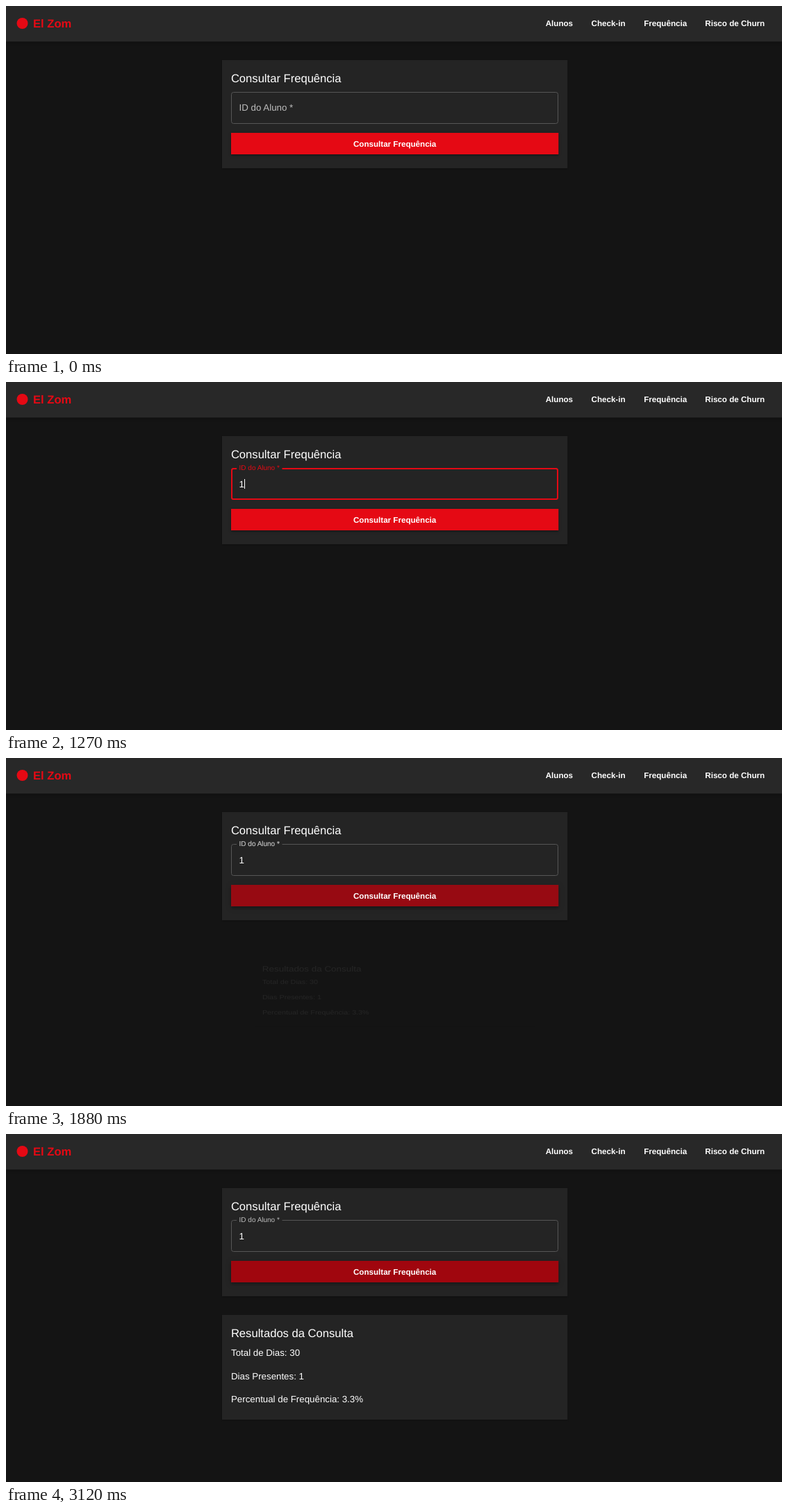
These frames come from a looping animation (1117 by 502 pixels, 4090 ms). An HTML page:

```html
<!DOCTYPE html>
<html lang="pt-BR">
<head>
<meta charset="utf-8">
<title>Consultar Frequência</title>
<style>
  html, body { margin: 0; width: 100%; height: 100%; overflow: hidden; background: #141414; }
  svg { display: block; width: 1117px; height: 502px; }
  text { font-family: "Liberation Sans", Arial, sans-serif; font-size: 13.3px; fill: #fff; text-rendering: geometricPrecision; }
  .title { font-size: 16.6px; }
  .strong { font-size: 11.62px; font-weight: 700; }
  .brand { font-size: 16.6px; font-weight: 700; fill: #e50914; }
  .mark { fill: #e50914; }
  .bar { fill: #282828; filter: drop-shadow(0 2px 2px rgb(0 0 0 / .2)); }
  .card { fill: #242424; filter: drop-shadow(0 1px 1px rgb(0 0 0 / .2)); }

  /* Each delay is a moment on the shared timeline; the script seeks them all. */
  .outline { fill: none; stroke: #565656; animation: whiten 90ms 900ms paused; }
  .focus { fill: none; stroke: #e50914; stroke-width: 2; }
  .focus, .caret { opacity: 0; }
  .focus { animation: show 600ms 990ms paused; }
  .caret { fill: #fff; animation: show 600ms 990ms paused, advance 1ms 1260ms forwards paused; }
  .value { opacity: 0; animation: show 1ms 1260ms forwards paused; }
  .notch {
    fill: #242424; transform: scaleX(0); transform-origin: 332px 124px;
    animation: open 100ms 1040ms cubic-bezier(0, 0, .2, 1) forwards paused;
  }
  .label {
    fill: #bdbdbd; transform: translate(335.6px, 151px);
    animation: shrink 200ms 990ms cubic-bezier(0, 0, .2, 1) forwards paused,
               redden 600ms 990ms paused, thicken 1520ms 1600ms paused;
  }
  .button {
    fill: #e50914;
    filter: drop-shadow(0 2px 1px rgb(0 0 0 / .25)) drop-shadow(0 1px 2px rgb(0 0 0 / .12));
    animation: brush 280ms 830ms paused, darken 250ms 1270ms cubic-bezier(.4, 0, .2, 1) forwards paused,
               press 490ms 1600ms paused;
  }
  .results {
    transform-origin: 559.5px 336.5px;
    animation: grow 560ms 1740ms cubic-bezier(.4, 0, .2, 1) both paused,
               fade 840ms 1750ms cubic-bezier(.4, 0, .2, 1) both paused;
  }

  @keyframes whiten { from, to { stroke: #fff; } }
  @keyframes show { from, to { opacity: 1; } }
  @keyframes advance { from, to { transform: translateX(7px); } }
  @keyframes open { to { transform: none; } }
  @keyframes shrink { to { transform: translate(335.6px, 127px) scale(.75); } }
  @keyframes redden { from, to { fill: #e50914; } }
  @keyframes thicken { from, to { stroke: #bdbdbd; stroke-width: .3px; } }
  @keyframes brush { 36% { fill: #de0913; } }
  @keyframes darken {
    to {
      fill: #a0060e;
      filter: drop-shadow(0 3px 2px rgb(0 0 0 / .25)) drop-shadow(0 1px 4px rgb(0 0 0 / .12));
    }
  }
  @keyframes press { 57% { fill: #970a12; } }
  @keyframes grow { from { transform: scale(.75, .5625); } to { transform: none; } }
  @keyframes fade { from { opacity: 0; } to { opacity: 1; } }
</style>
</head>
<body>
<svg viewBox="0 0 1117 502">
  <rect class="bar" width="1117" height="51.3"/>
  <circle class="mark" cx="23.5" cy="25" r="8"/>
  <text class="brand" x="39" y="31">El Zom</text>
  <g>
    <text class="strong" x="776.7" y="29">Alunos</text>
    <text class="strong" x="842.5" y="29">Check-in</text>
    <text class="strong" x="918.2" y="29">Frequência</text>
    <text class="strong" x="1006.3" y="29">Risco de Churn</text>
  </g>

  <rect class="card" x="311" y="78" width="497.3" height="156"/>
  <text class="title" x="323.9" y="110">Consultar Frequência</text>
  <rect class="outline" x="324.5" y="124.5" width="470" height="45" rx="3"/>
  <rect class="focus" x="325" y="125" width="469" height="44" rx="2.5"/>
  <rect class="notch" x="332" y="123" width="65.5" height="3.2"/>
  <text class="label">ID do Aluno *</text>
  <text class="value" x="335.6" y="152">1</text>
  <rect class="caret" x="336" y="140" width="1" height="14"/>
  <rect class="button" x="324" y="183" width="471.3" height="31"/>
  <text class="strong" x="559.6" y="202.6" text-anchor="middle">Consultar Frequência</text>

  <g class="results">
    <rect class="card" x="311" y="261" width="497.3" height="151"/>
    <text class="title" x="323.9" y="293">Resultados da Consulta</text>
    <text x="324" y="320">Total de Dias: 30</text>
    <text x="324" y="354">Dias Presentes: 1</text>
    <text x="324" y="387">Percentual de Frequência: 3.3%</text>
  </g>
</svg>
<script>
  const LOOP = 4090;
  // The picture is held between these moments.
  const ticks = [0, 790, 860, 930, 1000, 1070, 1140, 1200, 1270, 1330, 1400,
    1600, 1670, 1740, 1810, 1880, 1950, 2020, 2090, 2150, 2220, 2300, 2370, 2570, 3120];
  const animations = document.getAnimations();
  const start = performance.now();

  function draw() {
    const time = (performance.now() - start) % LOOP;
    const tick = ticks.findLast(moment => moment <= time);
    for (const animation of animations) animation.currentTime = tick;
    requestAnimationFrame(draw);
  }
  draw();
</script>
</body>
</html>
```
